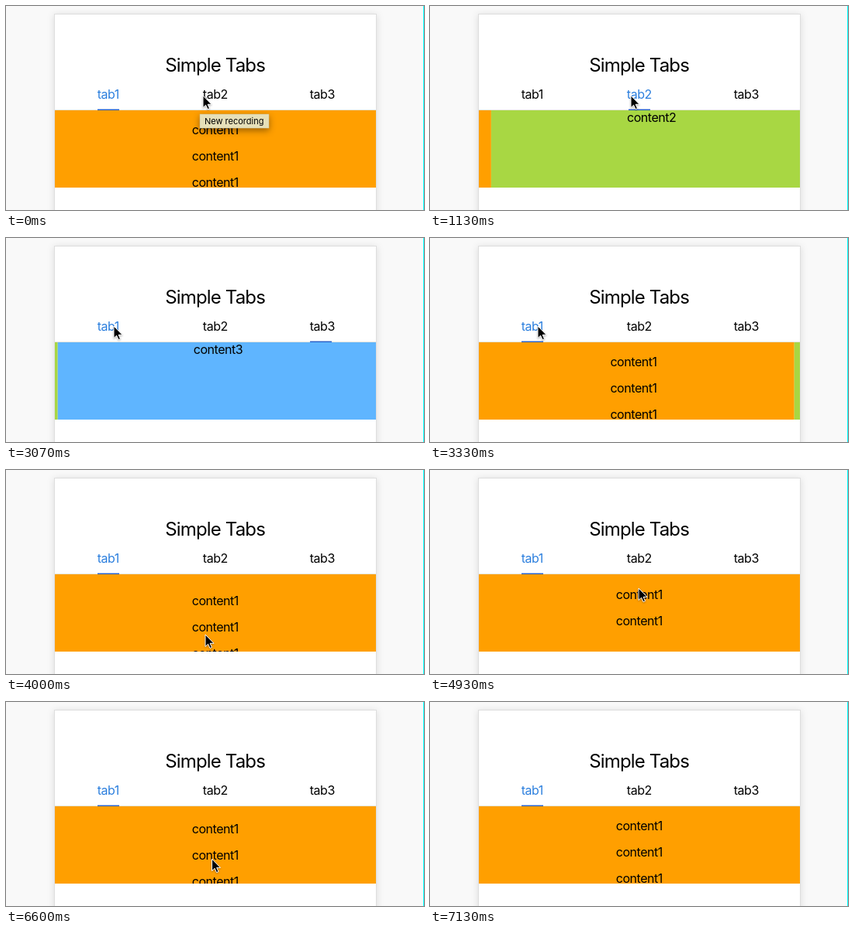
Animation, 539 px wide and 264 px high, one loop 7390 ms. Source, as an HTML page:

```html
<!DOCTYPE html>
<html lang="en">
<head>
<meta charset="utf-8">
<title>Simple Tabs</title>
<style>
  html, body { margin: 0; width: 100%; height: 100%; overflow: hidden; background: #f9f9f9; }
  svg { display: block; font: 16px Inter, "Noto Sans", sans-serif; letter-spacing: -.45px; }
  .middle { text-anchor: middle; }
  .title { font-size: 24px; letter-spacing: -.85px; }
  .tip { font-size: 11px; letter-spacing: 0; }
  .card { filter: drop-shadow(0 1px 5px rgba(0, 0, 0, .12)); }
  .shade { filter: drop-shadow(0 3px 4px rgba(0, 0, 0, .4)); }
  #cursor { filter: drop-shadow(0 1px 1px rgba(0, 0, 0, .3)); }
</style>
</head>
<body>
<svg width="539" height="264" viewBox="0 0 539 264">
  <defs>
    <clipPath id="view"><rect x="63" y="135" width="414" height="100"/></clipPath>
  </defs>
  <rect width="539" height="264" fill="#f9f9f9"/>
  <rect class="card" x="62.5" y="10.5" width="415" height="280" fill="#fff" stroke="#dedede"/>
  <rect x="538" width="1" height="264" fill="#0ff"/>
  <text class="middle title" x="269.6" y="85">Simple Tabs</text>
  <g id="tabs" class="middle"></g>
  <rect x="63" y="134" width="414" height="1" fill="#e4e4dc"/>
  <g clip-path="url(#view)">
    <g id="strip" class="middle">
      <rect x="63" y="135" width="414" height="100" fill="#ff9f00"/>
      <g id="lines"></g>
      <rect x="477" y="135" width="414" height="100" fill="#a8d743"/>
      <text x="683.8" y="150">content2</text>
      <rect x="891" y="135" width="414" height="100" fill="#5fb5ff"/>
      <text x="1097.8" y="150">content3</text>
    </g>
  </g>
  <rect id="bar" x="118" y="133.5" width="28" height="1.5" fill="#2a62c8"/>
  <g id="tooltip">
    <rect class="shade" x="250" y="140" width="89" height="18" fill="#e6e0b9" stroke="#c9c4a2" stroke-width=".5"/>
    <text class="tip" x="256" y="153">New recording</text>
  </g>
  <path id="cursor" d="M0 0V15.5L3.6 12.2L6 17.6L8.5 16.5L6.1 11.3H11Z" fill="#000" stroke="#fff"/>
</svg>
<script>
const LOOP = 7390, PANEL = 414, TAB_GAP = 138;
const $ = id => document.getElementById(id);

function addText(parent, x, y, content) {
  const node = document.createElementNS("http://www.w3.org/2000/svg", "text");
  node.setAttribute("x", x);
  node.setAttribute("y", y);
  node.textContent = content;
  return parent.appendChild(node);
}

const tabs = [0, 1, 2].map(i => addText($("tabs"), 131.8 + i * TAB_GAP, 120, "tab" + (i + 1)));
for (let i = 0; i < 4; i++) addText($("lines"), 269.8, 166 + i * 34, "content1");

// Tab selections: [time, from, to]
const clicks = [[905, 0, 1], [1985, 1, 2], [3068, 2, 0]];

// Pointer tip: [time, x, y]
const pointer = [
  [0, 254, 116], [450, 254, 116], [730, 259, 116], [1200, 259, 116],
  [1600, 371, 119], [1800, 391, 118], [2280, 391, 118], [3000, 139, 114],
  [3430, 139, 114], [3830, 258, 195], [4000, 257, 213], [4150, 257, 219],
  [4450, 262, 214], [4930, 269, 153], [5010, 269, 150], [5220, 270, 150],
  [5560, 272, 223], [5800, 275, 158], [6000, 275, 158], [6300, 270, 212],
  [6750, 264, 200], [7110, 262, 63]
];

// Dragged list offset with overshoot: [time, y]
const scroll = [
  [3830, 0], [4000, 9], [4150, 12], [4360, 0], [4450, 0], [4930, -67],
  [5010, -68], [5220, -52], [5560, 6], [5800, -.6], [6000, 0],
  [6300, 25], [6700, 0]
];

const clamp = v => Math.min(1, Math.max(0, v));
const smooth = v => v * v * (3 - 2 * v);

// CSS "ease" curve
function ease(x) {
  if (x <= 0 || x >= 1) return clamp(x);
  const curve = (a, b, s) => 3 * a * s * (1 - s) ** 2 + 3 * b * s * s * (1 - s) + s ** 3;
  let low = 0, high = 1;
  for (let i = 0; i < 20; i++) {
    const mid = (low + high) / 2;
    if (curve(.25, .25, mid) < x) low = mid; else high = mid;
  }
  return curve(.1, 1, low);
}

function sample(keys, t, column) {
  const next = keys.findIndex(key => key[0] > t);
  if (next < 0) return keys[keys.length - 1][column];
  if (next === 0) return keys[0][column];
  const a = keys[next - 1], b = keys[next];
  return a[column] + (b[column] - a[column]) * smooth((t - a[0]) / (b[0] - a[0]));
}

function position(t, duration) {
  const click = clicks.filter(c => c[0] <= t).pop();
  if (!click) return 0;
  const [start, from, to] = click;
  return from + (to - from) * ease((t - start) / duration);
}

const move = (id, x, y) => $(id).setAttribute("transform", `translate(${x} ${y})`);

function draw(t) {
  const click = clicks.filter(c => c[0] <= t).pop();
  const active = click ? click[2] : 0;
  tabs.forEach((tab, i) => tab.setAttribute("fill", i === active ? "#2c7fde" : "#000"));
  move("strip", -PANEL * position(t, 300), 0);
  move("bar", TAB_GAP * position(t, 200), 0);
  move("lines", 0, sample(scroll, t, 1));
  move("cursor", sample(pointer, t, 1), sample(pointer, t, 2));
  $("cursor").setAttribute("visibility", t < 7110 ? "visible" : "hidden");
  $("tooltip").setAttribute("opacity", 1 - clamp((t - 40) / 230));
}

const begin = performance.now();
function tick() {
  draw((performance.now() - begin) % LOOP);
  requestAnimationFrame(tick);
}
draw(0);
requestAnimationFrame(tick);
</script>
</body>
</html>
```
